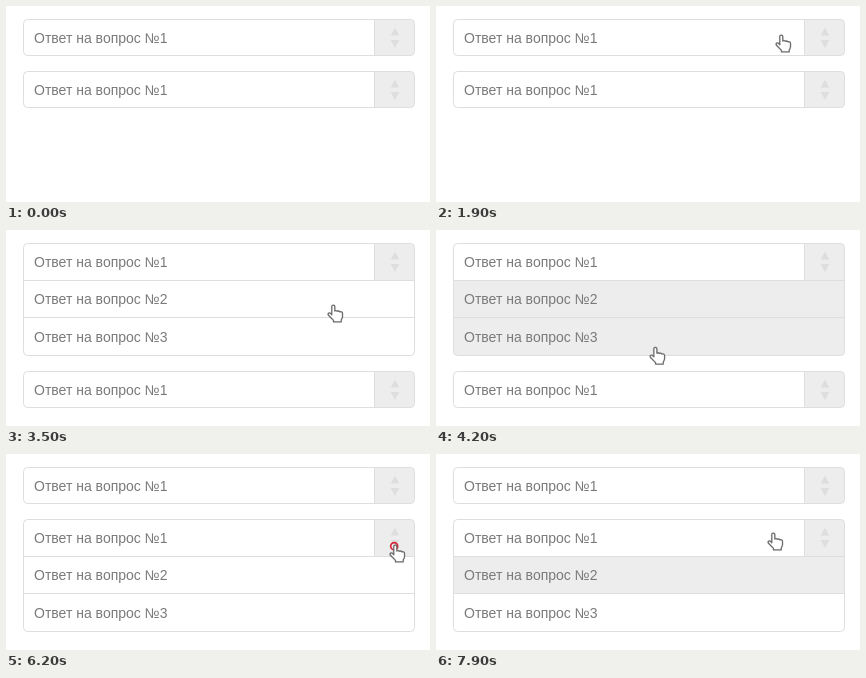
An HTML page with a canvas for the animation above (8 s loop, 424x196 px).

```html
<!DOCTYPE html>
<html lang="ru">
<head>
<meta charset="utf-8">
<title>Выпадающие списки</title>
<style>
  html, body { margin: 0; width: 100%; height: 100%; overflow: hidden; background: #fff; }
  canvas { display: block; width: 424px; height: 196px; }
</style>
</head>
<body>
<canvas id="stage"></canvas>
<script>
const W = 424, H = 196, LOOP = 8000, STEP = 100;
const LINE = '#dedede', FILL = '#ededed', TEXT = '#7a7a7a';
const LEFT = 17.5, RIGHT = 408.5, DIVIDER = 368.5;
const ROW = 37, GAP = 15, TOP = 13;
const APPEAR = 500, RING_TIME = 500;
const [OPEN_FIRST, CLOSE_FIRST, OPEN_SECOND] = [2500, 5400, 6200];

const canvas = document.getElementById('stage');
const ctx = canvas.getContext('2d');
const scale = window.devicePixelRatio || 1;
canvas.width = W * scale;
canvas.height = H * scale;

// Pointer moves: start, duration, destination
const origin = [126, 126];
const moves = [
  [400, 700, 340, 28],
  [1300, 300, 332, 73],
  [1600, 300, 340, 28],
  [2000, 200, 373, 26],
  [3200, 300, 322, 74],
  [3500, 600, 226, 146],
  [4100, 300, 180, 31],
  [4400, 400, 64, 94],
  [5000, 200, 383, 26],
  [6000, 200, 384, 90],
  [6200, 400, 300, 173],
  [6600, 400, 127, 157],
  [7000, 300, 336, 114],
  [7500, 400, 332, 78]
];

const ease = u => u * u * (3 - 2 * u);

function pointerAt(t) {
  let [x, y] = origin;
  for (const [start, duration, toX, toY] of moves) {
    const k = ease(Math.min(1, Math.max(0, (t - start) / duration)));
    x += (toX - x) * k;
    y += (toY - y) * k;
  }
  return [x, y];
}

// Highlights trail behind the pointer and linger
function isLit(t, rowTop) {
  for (let lag = 300; lag <= 700; lag += STEP) {
    const tip = pointerAt(t - lag)[1] + 2;
    if (tip >= rowTop && tip < rowTop + ROW) return true;
  }
  return false;
}

function line(x0, y0, x1, y1) {
  ctx.beginPath();
  ctx.moveTo(x0, y0);
  ctx.lineTo(x1, y1);
  ctx.stroke();
}

function triangle(baseY, tipY) {
  ctx.beginPath();
  ctx.moveTo(384.7, baseY);
  ctx.lineTo(393.3, baseY);
  ctx.lineTo(389, tipY);
  ctx.fill();
}

function drawSelect(t, top, open) {
  const rows = open ? 3 : 1;
  const height = open ? 3 * ROW + 1 : ROW - 1;
  ctx.save();
  ctx.translate(0, top);
  ctx.lineWidth = 1;
  ctx.strokeStyle = LINE;

  const frame = new Path2D();
  frame.roundRect(LEFT, 0.5, RIGHT - LEFT, height, 4);
  ctx.save();
  ctx.clip(frame);
  ctx.fillStyle = FILL;
  ctx.fillRect(DIVIDER, 0, RIGHT - DIVIDER, ROW);
  line(DIVIDER, 0, DIVIDER, ROW);
  for (let i = 1; i < rows; i++) {
    const y = i * ROW;
    if (isLit(t, top + y)) ctx.fillRect(LEFT, y + 1, RIGHT - LEFT, ROW);
    line(LEFT, y + 0.5, RIGHT, y + 0.5);
  }
  ctx.restore();
  ctx.stroke(frame);

  ctx.fillStyle = LINE;
  triangle(16.5, 8.5);
  triangle(21, 29);

  ctx.fillStyle = TEXT;
  for (let i = 0; i < rows; i++) {
    ctx.fillText('Ответ на вопрос №' + (i + 1), 28, 24 + Math.round(i * 37.4));
  }
  ctx.restore();
  return top + height + 1 + GAP;
}

const hand = new Path2D(
  'M4.5 10.3V2.2a1.5 1.5 0 0 1 3 0V6.6q1.3-1 2.6.3q1.3-.8 2.5.6' +
  'q2.6-.6 2.6 1.6V12q0 1.6-1.3 3.4V17.5H6.2V16L1.2 10.9' +
  'q-1-1.5.3-2.2q1-.5 1.8.4Z'
);

function drawPointer([x, y]) {
  ctx.save();
  ctx.translate(x - 0.7, y + 0.4);
  ctx.lineJoin = 'round';
  ctx.fillStyle = '#fff';
  ctx.strokeStyle = '#6c6c6c';
  ctx.lineWidth = 1.3;
  ctx.shadowColor = 'rgba(0,0,0,.2)';
  ctx.shadowBlur = 2 * scale;
  ctx.fill(hand);
  ctx.shadowColor = 'transparent';
  ctx.stroke(hand);
  ctx.restore();
}

function drawRing([x, y], progress) {
  ctx.save();
  ctx.globalAlpha = 1 - progress;
  ctx.strokeStyle = '#d8283c';
  ctx.lineWidth = 1.7;
  ctx.beginPath();
  ctx.arc(x + 4.2, y + 2.2, 3.5 + 12 * progress, 0, Math.PI * 2);
  ctx.stroke();
  ctx.restore();
}

function draw(t) {
  ctx.setTransform(scale, 0, 0, scale, 0, 0);
  ctx.fillStyle = '#fff';
  ctx.fillRect(0, 0, W, H);
  ctx.font = '14px "Liberation Sans", Arial, sans-serif';

  const next = drawSelect(t, TOP, t >= OPEN_FIRST && t < CLOSE_FIRST);
  drawSelect(t, next, t >= OPEN_SECOND);
  if (t < APPEAR) return;

  for (const click of [OPEN_FIRST, CLOSE_FIRST, OPEN_SECOND]) {
    const progress = (t - click) / RING_TIME;
    if (progress >= 0 && progress < 1) drawRing(pointerAt(click), progress);
  }
  drawPointer(pointerAt(t));
}

const start = performance.now();
function tick() {
  const t = (performance.now() - start) % LOOP;
  draw(Math.floor(t / STEP) * STEP);
  requestAnimationFrame(tick);
}
tick();
</script>
</body>
</html>
```
